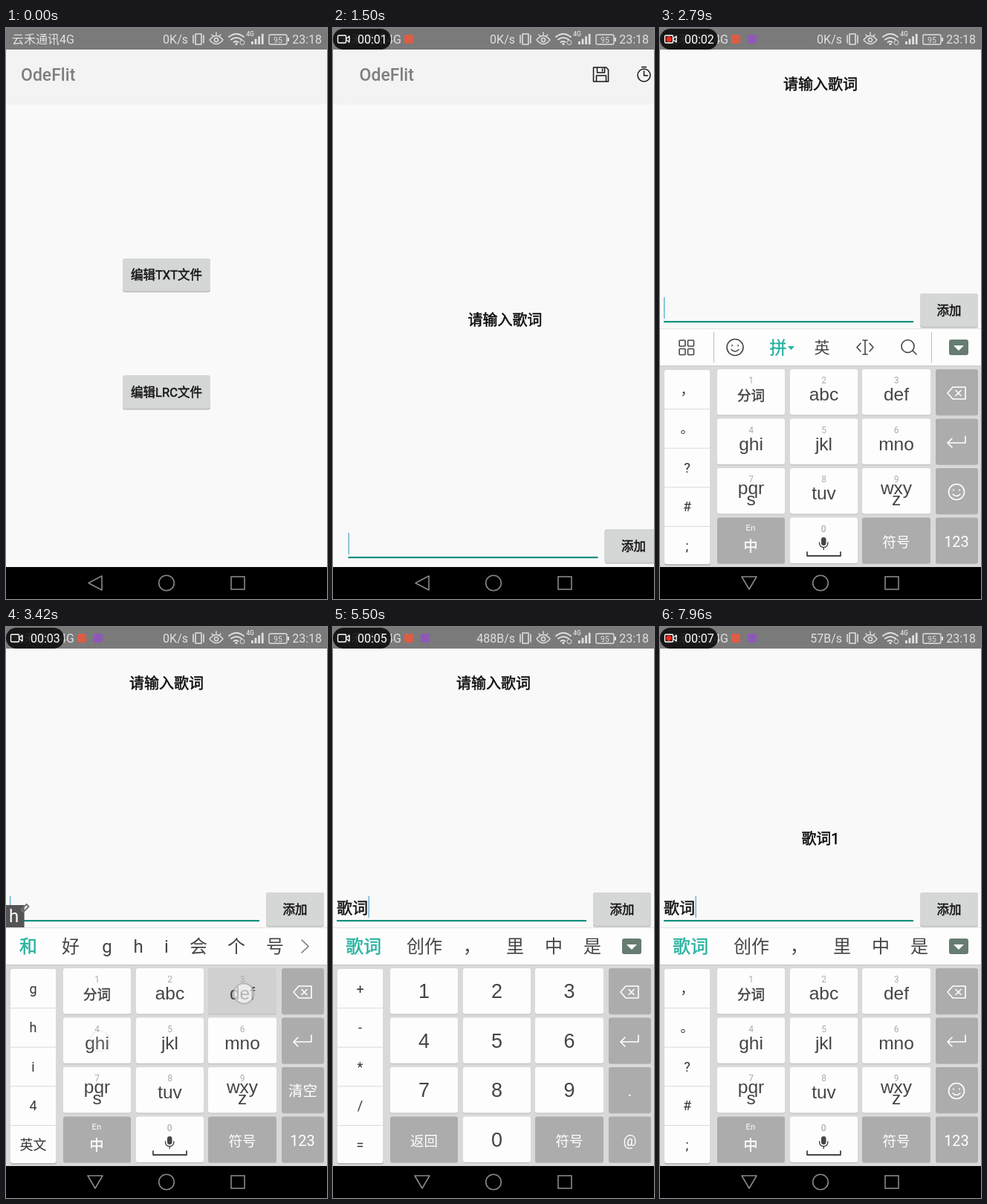
An HTML page for the animation above (8000 ms loop, 432 px wide and 768 px high).

```html
<!DOCTYPE html>
<html lang="zh-CN">
<head>
<meta charset="utf-8">
<title>OdeFlit</title>
<style>
html, body { margin: 0; width: 100%; height: 100%; overflow: hidden; background: #000; }
svg { display: block; width: 100vw; height: 100vh; }
text { font-family: Roboto, 'Noto Sans CJK SC', 'Noto Sans CJK', sans-serif; white-space: pre; stroke-width: 0; }
.mid { text-anchor: middle; }
.end { text-anchor: end; }
.med { font-weight: 500; }
.bold { stroke-width: .5px; }
.abc { font-family: 'Liberation Sans', 'Noto Sans CJK SC', sans-serif; }
.line { fill: none; stroke-linejoin: round; stroke-linecap: round; }
</style>
</head>
<body>
<svg id="stage" viewBox="0 0 432 768" preserveAspectRatio="none"></svg>
<script>
const LOOP = 8000, TICK = 75, PAN = 317;
const C = {
  page: '#f9f9f9', bar: '#f3f3f3', status: '#7a7a7a', pale: '#e0e0e0',
  button: '#d5d6d6', pressed: '#c9caca', shade: '#bcbcbc',
  key: '#fdfdfd', keyDown: '#d0d0d0', board: '#d9d9d9', fn: '#acacac', edge: '#bababa',
  ink: '#454545', teal: '#27b3a0', rule: '#12907f', drop: '#677c70', nav: '#888'
};

const text = (x, y, size, str, fill = '#0c0c0c', cls = 'mid') =>
  `<text x="${x}" y="${y}" font-size="${size}" fill="${fill}" stroke="${fill}" class="${cls}">${str}</text>`;
const rect = (x, y, w, h, fill, r = 0, more = '') =>
  `<rect x="${x}" y="${y}" width="${w}" height="${h}" rx="${r}" fill="${fill}" ${more}/>`;
const line = (d, color, w = 1.6) => `<path class="line" d="${d}" stroke="${color}" stroke-width="${w}"/>`;
const ring = (x, y, r, color, w = 1.6) =>
  `<circle cx="${x}" cy="${y}" r="${r}" fill="none" stroke="${color}" stroke-width="${w}"/>`;
const group = (id, body) => `<g id="${id}">${body}</g>`;

function button(id, x, y, w, h, label) {
  return rect(x, y + 1.5, w, h, C.shade, 3) +
    rect(x, y, w, h, C.button, 3, `id="${id}"`) +
    text(x + w / 2, y + h / 2 + 6, 16.5, label, '#141414', 'mid bold');
}

const appBar = rect(0, 29, 432, 74, C.bar) + text(20, 71, 23, 'OdeFlit', '#7e7e7e', 'med');

const home = rect(0, 0, 432, 768, C.page) + appBar +
  button('txtBtn', 157, 310, 118, 44, '编辑TXT文件') +
  button('lrcBtn', 157, 467, 118, 45, '编辑LRC文件');

const editor = rect(0, 0, 432, 1100, C.page) + appBar +
  line('M336 53h16l3 3v16h-20v-19zM340 53v7h10v-7M347 55v3M339 72v-8h13v8', '#141414', 1.5) +
  ring(403, 63.5, 8.5, '#141414', 1.5) + line('M403 58v6h5M400 52.5h6', '#141414', 1.5) +
  text(216, 400, 20, '请输入歌词', '#0c0c0c', 'mid bold" id="lyric') +
  text(5, 702, 21, '', '#141414', 'bold" id="field') +
  rect(5, 679, 1.4, 29, '#62b0d2', 0, 'id="caret"') +
  rect(5, 711, 336, 2.2, C.rule) +
  button('addBtn', 350, 674, 78, 45, '添加');

function statusBar() {
  const p = C.pale;
  let s = rect(0, 0, 432, 29, C.status) + text(8, 21, 16, '云禾通讯4G', p, '') +
    text(245, 21, 16, '', p, 'end" id="speed') +
    line('M255 8h8v14h-8zM252 10v10M266 10v10', p) +
    line('M274 16q9 -11 18 0q-9 11 -18 0M277 9l2 2M283 6v3M289 9l-2 2', p, 1.4) + ring(283, 16, 2.6, p, 1.5) +
    line('M300 12q10 -8 20 0M303 15.500q7 -5 14 0M306.500 19q3 -2 6 0', p, 2) +
    `<circle cx="310" cy="21.500" r="1.600" fill="${p}"/>` + ring(318, 19.5, 3, p, 1) +
    text(328.5, 11, 8.5, '4G', p, 'mid med');
  for (let i = 0; i < 4; i++) s += rect(330 + i * 4.6, 18 - i * 3.4, 2.8, 4 + i * 3.4, p);
  return s + rect(354, 9, 24, 13, 'none', 2, `stroke="${p}" stroke-width="1.4"`) + rect(379, 13, 2, 5, p) +
    text(366, 19.5, 10.5, '95', p) + text(425, 21, 16, '23:18', p, 'end') +
    rect(118, 9, 12, 12, '#8d59b8', 2, 'id="imeDot"') +
    group('rec', rect(96, 9, 12, 12, '#dc5d45', 2) +
      rect(0, 1, 78, 28, '#000', 14, 'opacity=".82"') +
      rect(6.5, 10, 11, 10, 'none', 1.5, 'stroke="#fff" stroke-width="1.4"') +
      line('M18 14l4 -3v8l-4 -3', '#fff', 1.4) +
      '<circle id="blink" cx="12" cy="15" r="3.800" fill="#ef2a1c"/>' +
      text(33, 21, 16, '', '#fff', '" id="clock'));
}

const nav = rect(0, 725, 432, 43, '#000') +
  group('backKey', line('M129 737v19l-18 -9.500z', C.nav)) +
  group('downKey', line('M110 738h20l-10 17z', C.nav)) +
  ring(216, 746.5, 10.3, C.nav) + rect(303, 738, 18, 17, 'none', 0, `stroke="${C.nav}" stroke-width="1.600"`);

// Keyboard grid
const colX = [77, 175, 272, 371], colW = [91, 91, 92, 57];
const rowY = r => 459 + r * 66.5;
const midX = c => colX[c] + colW[c] / 2;
const names = ['分词', 'abc', 'def', 'ghi', 'jkl', 'mno', 'pqr', 'tuv', 'wxy'];
const marks = ['，', '。', '?', '#', ';'];
const after = ['歌词', '创作', '，', '里', '中', '是'], afterX = [41, 123, 187, 245, 297, 349];
const pickX = [30, 87, 136, 178, 216, 259, 310, 362];

const smile = (x, y, r, color) => ring(x, y, r, color) +
  line(`M${x - 4} ${y - 3}v1M${x + 4} ${y - 3}v1M${x - 5} ${y + 3}q5 5 10 0`, color);
const dropdown = rect(389, 419, 26, 21, C.drop, 3) + '<path d="M395 427h14l-7 7z" fill="#fff"/>';

function topBar(s) {
  let out = rect(0, 404, 432, 51, '#fdfdfd') + rect(0, 404, 432, 1, '#e2e2e2') + rect(0, 454, 432, 1, '#c6c6c6');
  if (s.bar === 'tools') {
    for (const x of [26, 37.5]) for (const y of [420, 431.5])
      out += rect(x, y, 8, 8, 'none', 1, `stroke="${C.ink}" stroke-width="1.600"`);
    return out + smile(101, 429.5, 11, C.ink) + text(159, 438, 23, '拼', C.teal, 'mid bold') +
      `<path d="M172 428h9l-4.500 5z" fill="${C.teal}"/>` + text(218, 437, 21, '英', C.ink) +
      line('M270 424l-5 5.500l5 5.500M282 424l5 5.500l-5 5.500M273 420h6M276 420v19M273 439h6', C.ink) +
      ring(333.5, 428, 8.5, C.ink) + line('M340 434l5 5', C.ink) +
      rect(72, 409, 1, 41, '#bebebe') + rect(365, 409, 1, 41, '#bebebe') + dropdown;
  }
  const done = s.bar === 'after', list = done ? after : s.bar;
  const xs = done ? afterX : list[0].length > 1 ? [41, 114, 174, 226, 278, 330] : pickX;
  list.forEach((w, i) => out += text(xs[i], 438, 24, w, i ? C.ink : C.teal, i ? 'mid' : 'mid bold'));
  return out + (done ? dropdown : line('M398 421l9 8.500l-9 8.500', '#777'));
}

function keyboard(s, down) {
  const num = s.num;
  let out = rect(0, 404, 432, 321, C.board) + topBar(s);
  const cell = (c, r, fill) => rect(colX[c], rowY(r) + 1, colW[c], 61.5, C.edge, 3) +
    rect(colX[c], rowY(r), colW[c], 61.5, down === c + r * 4 ? C.keyDown : fill, 3);

  out += rect(6, 461, 62, 262, C.edge, 3) + rect(6, 460, 61.5, 261, C.key, 3);
  (num ? ['+', '-', '*', '/', '='] : s.side || marks).forEach((w, i) => {
    if (i) out += rect(6, 459.5 + i * 52.6, 61.5, 1, '#dadada');
    out += text(36.5, 492.5 + i * 52.6, 18, w, '#343434');
  });

  names.forEach((name, i) => {
    const c = i % 3, r = i / 3 | 0, x = midX(c), y = rowY(r);
    out += cell(c, r, C.key);
    if (num) { out += text(x, y + 40, 27, i + 1, C.ink, 'mid abc'); return; }
    const tail = { pqr: 's', wxy: 'z' }[name];
    out += text(x, y + 19, 12, i + 1, '#acacac');
    if (!i) out += text(x, y + 42, 18.5, name, C.ink, 'mid bold');
    else out += text(x, y + (tail ? 35 : 42), 24.5, name, C.ink, 'mid abc');
    if (tail) out += text(x, y + 50, 24.5, tail, C.ink, 'mid abc');
  });

  out += cell(0, 3, C.fn) + cell(1, 3, C.key) + cell(2, 3, C.fn);
  for (let r = 0; r < 4; r++) out += cell(3, r, C.fn);
  const w = '#fff';
  out += line('M387 491l7 -8h17v16h-17zM398 487.500l7 7M405 487.500l-7 7', w) +
    line('M411 549v9h-24M393 552l-6 6l6 6', w);
  if (num) {
    out += text(midX(0), 698, 18.5, '返回', w) + text(midX(1), 699, 27, '0', C.ink, 'mid abc') +
      text(midX(2), 698, 18.5, '符号', w) + text(399.5, 631, 22, '.', w) + text(399.5, 698, 20, '@', w);
  } else {
    out += text(122, 676, 11.5, 'En', w) + text(122, 704, 19, '中', w, 'mid bold') +
      text(220, 678, 12, '0', '#9c9c9c') + rect(217, 685, 6.5, 11, C.ink, 3.2) +
      line('M214.500 692q0 6.500 5.700 6.500q5.700 0 5.700 -6.500M220.200 698.500v3', C.ink, 1.4) +
      line('M198 705v5h45v-5', C.ink, 1.8) +
      text(318, 697.5, 18.5, '符号', w) + text(399, 698, 20, '123', w) +
      (s.comp ? text(399.5, 631, 19.5, '清空', w) : smile(399, 624, 10.5, w));
  }
  if (s.comp) {
    const width = 12 + s.comp.length * 12.6;
    out += rect(0, 374, width, 30, '#545454') + text(4, 397, 24, s.comp, '#fff', '') +
      line(`M${width - 4} 380l7 -7l3 3l-7 7z`, '#757575', 2);
  }
  return out;
}

// Keyboard states: each starts at t and keeps until the next
const picks1 = ['和', '好', 'g', 'h', 'i', '会', '个', '号'];
const picks2 = ['个', '和', '各', '给', '河', '合', '何', '歌'];
const picks3 = ['歌词', '个', '和', '各', '给', '歌'];
const typing = (edit, times) => [
  { bar: picks1, comp: 'h', side: ['g', 'h', 'i', '4', '英文'] },
  { bar: picks2, comp: 'ge', side: ['ge', 'he', 'g', 'h', '英文'] },
  { bar: picks2, comp: "ge'c", side: ['ge', 'he', 'g', 'h', '英文'] },
  { bar: picks3, comp: "ge'ci", side: ['ge', 'he', 'g', 'h', '英文'] }
].map((s, i) => ({ ...s, t: times[i], edit }));
const states = [
  { t: 0, bar: 'tools', edit: 2300 },
  ...typing(2300, [3240, 3440, 3740, 3990]),
  { t: 4300, bar: 'after', input: '歌词', edit: 4300 },
  { t: 4710, bar: 'after', input: '歌词', num: true, edit: 4300 },
  { t: 5600, bar: 'tools', input: '歌词1', num: true, edit: 5600 },
  { t: 6210, bar: 'tools', added: true, edit: 6210 },
  ...typing(6210, [6620, 6910, 7190, 7460]).map(s => ({ ...s, added: true })),
  { t: 7750, bar: 'after', input: '歌词', added: true, edit: 7750 }
];

// Touches: time down, x, y, key index or button id
const taps = [
  [880, 214, 334, 'txtBtn'], [2030, 170, 712],
  [3150, 126, 557, 4], [3350, 320, 493, 2], [3650, 222, 492, 1], [3900, 124, 560, 4], [4210, 42, 431],
  [4600, 400, 676, 15], [5510, 121, 493, 0], [6100, 388, 381, 'addBtn'],
  [6510, 110, 567, 4], [6820, 318, 494, 2], [7100, 220, 493, 1], [7370, 120, 562, 4], [7650, 42, 431]
];
const HOLD = 90, FADE = 230, RIPPLE = 400;

const stage = document.getElementById('stage');
stage.innerHTML = group('home', home) + group('editor', editor) + group('board', '') +
  statusBar() + nav + group('touches', '');
const el = {};
stage.querySelectorAll('[id]').forEach(n => el[n.id] = n);

const clamp = v => Math.max(0, Math.min(1, v));
const ease = (t, a, b) => 1 - Math.pow(1 - clamp((t - a) / (b - a)), 3);
const show = (n, on) => n.setAttribute('visibility', on ? 'visible' : 'hidden');
const move = (n, x, y) => n.setAttribute('transform', `translate(${x} ${y})`);
const put = (n, s) => { if (n.textContent !== s) n.textContent = s; };
const pressed = (t, hold, id) => taps.find(p =>
  t >= p[0] + 40 && t < p[0] + hold && (id ? p[3] === id : p[3] >= 0));
let drawn = '';

function draw(t) {
  const slide = ease(t, 1300, 1600), lift = ease(t, 2330, 2620);
  move(el.home, -130 * slide, 0);
  move(el.editor, 432 * (1 - slide), -PAN * lift);
  show(el.editor, slide > 0);
  move(el.board, 0, 321 * (1 - lift));
  show(el.board, lift > 0);
  show(el.backKey, lift === 0);
  show(el.downKey, lift > 0);
  show(el.imeDot, lift > 0);

  const i = states.findLastIndex(s => s.t <= t), s = states[i];
  const down = pressed(t, HOLD)?.[3];
  if (drawn !== i + '/' + down) {
    drawn = i + '/' + down;
    el.board.innerHTML = keyboard(s, down);
  }
  for (const id of ['txtBtn', 'addBtn'])
    el[id].setAttribute('fill', pressed(t, RIPPLE, id) ? C.pressed : C.button);

  const input = s.input || '';
  put(el.field, input);
  put(el.lyric, s.added ? '歌词1' : '请输入歌词');
  el.lyric.setAttribute('y', s.added ? 609 : 400);
  el.caret.setAttribute('x', 5 + (input ? 42.5 : 0) + (input.length > 2 ? 12 : 0));
  show(el.caret, slide > 0 && (t < 2300 || (t - s.edit) % 1000 < 500));

  const run = Math.max(0, t - TICK);
  put(el.clock, '00:0' + Math.floor(run / 1000));
  el.rec.setAttribute('opacity', clamp((t - 40) / 150));
  show(el.blink, run % 1000 >= 500);
  put(el.speed, t < 4200 ? '0K/s' : t < 7200 ? '488B/s' : '57B/s');

  el.touches.innerHTML = taps.map(([t0, x, y]) => {
    const a = t < t0 ? 0 : 1 - clamp((t - t0 - HOLD) / FADE);
    return a ? `<circle cx="${x}" cy="${y}" r="13.500" fill="#fff" fill-opacity="${.6 * a}"
      stroke="#9c9c9c" stroke-opacity="${.6 * a}" stroke-width="2"/>` : '';
  }).join('');
}

const start = performance.now();
function frame(now) {
  draw(Math.max(0, now - start) % LOOP);
  requestAnimationFrame(frame);
}
draw(0);
requestAnimationFrame(frame);
</script>
</body>
</html>
```
